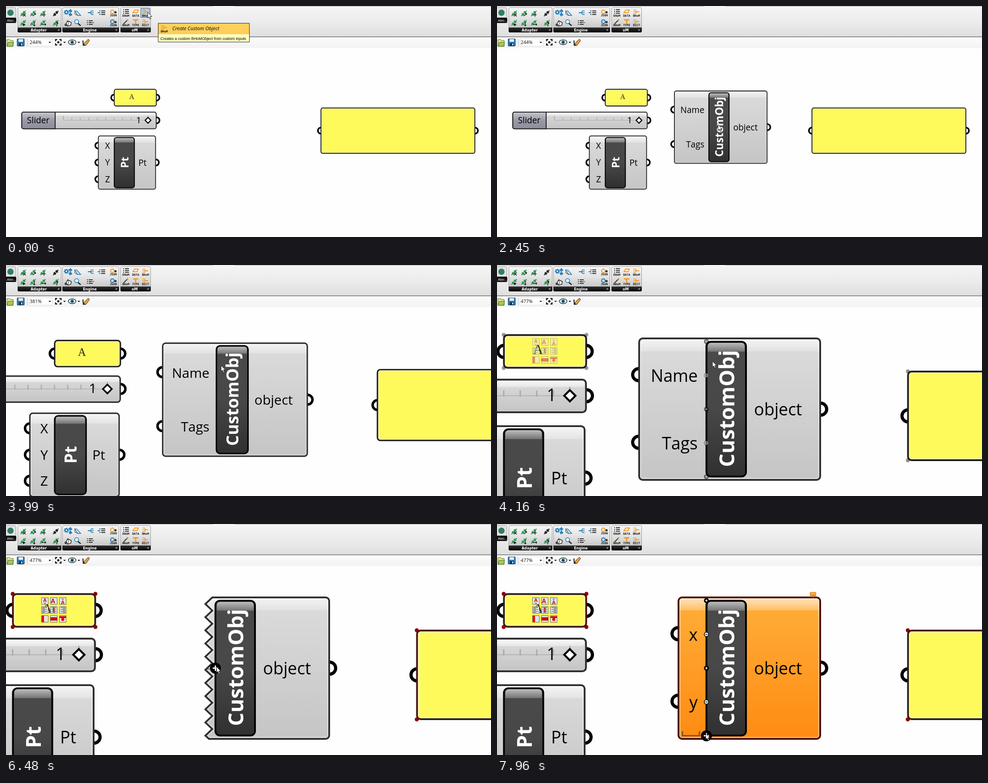
An HTML page with a canvas for the animation above (8 s loop, 1085 by 516 pixels).

```html
<!DOCTYPE html>
<html>
<head>
<meta charset="utf-8">
<style>
html, body { margin: 0; width: 100%; height: 100%; overflow: hidden; background: #fff }
canvas { display: block }
</style>
</head>
<body>
<canvas id="stage" width="1085" height="516"></canvas>
<script>
const g = document.getElementById('stage').getContext('2d');
g.fontKerning = 'none';
const UI = '"Open Sans", sans-serif', ARIAL = '"Liberation Sans", sans-serif';
const LOOP = 8000, FX = 479.6, FY = 217;   // fixed point of the zoom

// Cursor moves: start, end, number of steps, new x, new y
const moves = [
  [1060, 1590, 8, 501, 272], [2380, 2600, 4, 475, 244], [3380, 3540, 3, 480, 239],
  [3770, 4080, 5, 482, 215], [4235, 4390, 3, 477, 234], [4550, 4550, 1, 475, 241],
  [5080, 5550, 7, 463, 323], [5860, 6020, 3, 470, 264], [6160, 6260, 2, 468, 315],
  [6410, 6480, 2, 471, 319], [6890, 7500, 9, 467, 466], [7960, 7960, 1, 467, 468]
];
// Values that jump at given times
const zooms = [[0, 244], [3770, 305], [3850, 342], [3925, 381], [4000, 427], [4080, 477]];
const fades = [[0, 0], [4080, .2], [4160, .45], [4235, .65], [4312, .85], [4390, 1]];
const inputs = [[0, null], [2060, ['Name', 'Tags']], [4930, ['Tags']], [5700, []], [6740, ['x']], [7800, ['x', 'y']]];
const leftEdge = { Name: 318, Tags: 340, x: 406 };

const at = (steps, t) => steps.filter(s => s[0] <= t).pop()[1];
const within = (t, a, b) => t >= a && t < b;

function cursorAt(t) {
  let x = 317, y = 14;
  for (const [a, b, n, nx, ny] of moves) {
    if (t < a) break;
    const p = t >= b ? 1 : (Math.floor((t - a) / (b - a) * (n - 1)) + 1) / n;
    x += (nx - x) * p;
    y += (ny - y) * p;
  }
  return [x, y];
}

function grad(y, h, ...colors) {
  const l = g.createLinearGradient(0, y, 0, y + h);
  colors.forEach((c, i) => l.addColorStop(i / (colors.length - 1), c));
  return l;
}
function paint(fill, stroke, lw = 1) {
  if (fill) { g.fillStyle = fill; g.fill(); }
  if (stroke) { g.strokeStyle = stroke; g.lineWidth = lw; g.stroke(); }
}
function box(x, y, w, h, fill, stroke, lw, r = 0) {
  g.beginPath(); g.roundRect(x, y, w, h, r); paint(fill, stroke, lw);
}
function dot(x, y, r, fill, stroke, lw) {
  g.beginPath(); g.arc(x, y, r, 0, 7); paint(fill, stroke, lw);
}
function poly(pts, fill, stroke, lw) {
  g.beginPath();
  for (let i = 0; i < pts.length; i += 2) g.lineTo(pts[i], pts[i + 1]);
  if (fill) g.closePath();
  paint(fill, stroke, lw);
}
function text(s, x, y, font, color = '#000', align = 'left') {
  g.font = font; g.fillStyle = color; g.textAlign = align; g.fillText(s, x, y);
}
function moved(x, y, angle, draw) {
  g.save(); g.translate(x, y); g.rotate(angle); draw(); g.restore();
}

// ---- Canvas objects, in coordinates of 477 % zoom ----
const label = (s, x, y, align, color) => text(s, x, y, '37.5px ' + UI, color, align);
const grip = (x, y) => dot(x, y, 13.5, '#fff', '#000', 7);

function capsule(x, y, w, h, glossy = h > 100) {
  box(x, y, w, h, grad(y, h, '#dcdcdc', '#c5c5c5'), null, 0, 8);
  if (glossy) {
    box(x + 3, y + 3, w - 6, h - 6, null, 'rgba(255,255,255,.35)', 3, 6);
    box(x + 3, y + 2, w - 6, 27, grad(y, 30, 'rgba(255,255,255,.75)', 'rgba(255,255,255,.25)'));
  } else box(x + 3, y + 3, w - 6, 14, grad(y, 17, '#fff', '#e4e4e4'), null, 0, 6);
  box(x, y, w, h, null, '#303030', 4, 8);
}
function nameplate(s, x, y, w, h, cy, size) {
  box(x, y, w, h, grad(y, h, '#4a4a4a', '#484848', '#303030'), null, 0, 10);
  box(x + 3, y + 2, w - 6, 20, grad(y, 22, '#c4c4c4', '#747474'), null, 0, [7, 7, 0, 0]);
  box(x, y, w, h, null, '#000', 4, 10);
  moved(x + 62, cy, -Math.PI / 2, () => text(s, 0, 0, `bold ${size}px ${UI}`, '#fff', 'center'));
}
function panel(x, y, w, h, alpha) {
  grip(x, y + h / 2); grip(x + w, y + h / 2);
  box(x, y, w, h, '#fffa5c', null, 0, 8);
  box(x + 3, y + 3, w - 6, h - 6, null, '#fffcb0', 3, 5);
  box(x, y, w, h, null, '#1e1e1e', 4, 8);
  const color = alpha < 1 ? '#302020' : '#8b0000';
  g.globalAlpha = alpha;
  box(x - .5, y - .5, w + 1, h + 1, null, color, 1);
  for (const px of [x - .5, x + w + .5]) for (const py of [y - .5, y + h + .5]) dot(px, py, 4.5, color);
  g.globalAlpha = 1;
}
function alignIcons(alpha) {
  g.globalAlpha = alpha;
  for (let i = 0; i < 9; i++) {
    const col = i % 3, row = i / 3 | 0, x = 79 + col * 20, y = 164 + row * 20;
    box(x + .5, y + .5, 15, 15, '#e4e4e4', '#666');
    if (row == 0) {
      text('A', x + (col == 1 ? 6 : 8), y + [10, 13, 15][col], `bold ${col == 1 ? 14 : 11}px ${ARIAL}`, '#c00020', 'center');
      if (col != 1) poly(col ? [x + 5, y + 5, x + 8, y + 2, x + 11, y + 5] : [x + 5, y + 12, x + 8, y + 15, x + 11, y + 12], '#777');
    } else if (row == 1) {
      for (let k = 0; k < 6; k++) {
        const w = k % 2 ? 6 : 11;
        box(x + [2, 8 - w / 2, 14 - w][col], y + 2 + k * 2.2, w, 1, '#444');
      }
      if (col == 1) box(x + 7, y + 3, 2, 10, '#d00020');
    } else if (col == 0) box(x + 1, y + 1, 5, 14, '#f00000');
    else if (col == 1) box(x + 1, y + 5, 14, 6, '#e00000', '#700');
    else { box(x + 1, y + 2, 14, 4, '#e00000'); dot(x + 8, y + 9, 3.5, '#e00000'); }
  }
  g.globalAlpha = 1;
}
function slider() {
  grip(200, 292);
  capsule(-389, 256, 588, 73);
  box(-389, 256, 146, 73, grad(256, 73, '#c6c6cf', '#9a9aa6', '#8c8c9b'), '#222', 4, [8, 0, 0, 8]);
  label('Slider', -317, 305, 'center');
  box(-207, 291, 370, 2, '#b4b4b4');
  for (let i = 0; i <= 10; i++) box(-208.5 + i * 37, i % 10 ? 280 : 272, 3, i % 10 ? 14 : 20, '#aaa');
  label('1', 122, 304, 'center');
  poly([163, 279.5, 175.5, 292, 163, 304.5, 150.5, 292, 163, 279.5], '#fff', '#000', 4.5);
}
function point() {
  grip(197, 476);
  for (const y of [402, 476, 549]) grip(-54, y);
  capsule(-54, 360, 250, 233);
  ['X', 'Y', 'Z'].forEach((s, i) => label(s, -14, 416 + i * 73.5, 'center'));
  nameplate('Pt', 15.5, 367, 88, 220, 476, 46);
  label('Pt', 139, 490, 'center');
}
function widget(y, plus, hot) {
  const r = hot ? 12 : 5.5, ink = plus ? '#fff' : '#000', d = r * .5;
  dot(468.5, y, r - .7, plus ? '#000' : '#fff', '#000', hot ? 2 : 1.6);
  poly([468.5 - d, y, 468.5 + d, y], null, ink, hot ? 3 : 1.5);
  if (plus) poly([468.5, y - d, 468.5, y + d], null, ink, hot ? 3 : 1.5);
}
// Rounded body, with a jagged left side while there are no inputs
function objectPath(jagged, x) {
  const top = 164, bottom = 480, right = 723;
  g.beginPath();
  if (!jagged) return g.roundRect(x, top, right - x, bottom - top, 8);
  for (let i = 0; i <= 21; i++) g.lineTo(i % 2 ? 446 : 461.5, top + i * 14.7);
  g.lineTo(454, bottom);
  g.arcTo(right, bottom, right, top, 8);
  g.arcTo(right, top, 461.5, top, 8);
  g.closePath();
}
function customObject(t, list, alpha, [cx, cy]) {
  const n = list.length, orange = t >= 6740, x = n ? leftEdge[list[0]] : 446;
  const rows = n == 2 ? [246, 397] : n ? [322] : [];
  grip(724, 322);
  rows.forEach(y => grip(x - 1, n == 2 ? y - 1 : y));
  g.save();
  objectPath(!n, x);
  paint(orange ? grad(164, 316, '#ffae3a', '#ff8b12') : grad(164, 316, '#dcdcdc', '#c5c5c5'));
  g.clip();
  paint(null, 'rgba(255,255,255,.4)', 9);
  box(x, 164, 723 - x, 29, grad(164, 29, 'rgba(255,255,255,.7)', 'rgba(255,255,255,.22)'));
  g.restore();
  objectPath(!n, x);
  paint(null, orange ? '#4d0d08' : '#303030', 4);
  nameplate('CustomObj', 468.5, 171.5, 88.5, 301, 320.5, 47);
  rows.forEach((y, i) => label(list[i], 449, y + 14.5, 'right'));
  label('object', 575, 336);
  if (orange) {
    poly([704, 160, 711, 160, 707, 165], '#e07a10');
    box(700.5, 152.5, 13, 8, grad(152, 9, '#ffc060', '#ff8c14'), '#c8691a', 1, 1);
  }
  // previews of the insert or remove action
  const mark = 'rgba(50,50,50,.65)';
  if (within(t, 4700, 4930)) box(330.5, 180, 122, 132, null, mark, 3);
  if (within(t, 5550, 5700)) box(352.5, 180, 100, 284, null, mark, 3);
  if (within(t, 6410, 6740)) poly([451, 321, 451, 324, 458, 324], null, mark, 2);
  if (t >= 7500) poly([415, 463, 415, 473, 453, 473, 453, 463], null, mark, 3);

  if (!alpha) return;
  g.globalAlpha = alpha;
  const marks = n ? 2 * n : 0;
  for (let i = 0; i <= marks; i++) {
    const y = marks ? 171 + i * 302 / marks : 322;
    widget(y, i % 2 == 0, alpha == 1 && Math.hypot(cx - 468.5, cy - y) < 11);
  }
  g.globalAlpha = 1;
}

// ---- Toolbars ----
const BLUE = '#1778b8', ORANGE = '#f09a2a', GREEN = '#2f9a55';

function plug(x, y, color, sign) {
  moved(x, y, -Math.PI / 4, () => {
    box(-8, -1, 4, 2, color);
    box(-5, -3, 5, 6, color, null, 0, 2);
    box(1, -3, 5, 6, color, null, 0, 2);
    box(6, -1, 3, 2, color);
  });
  if (sign) text(sign, x + 3, y + 7, 'bold 12px "DejaVu Sans", sans-serif', '#111', 'center');
}
function branches(x, y, color, flip = 1) {
  for (const d of [-4, 0, 4]) poly([x - 6 * flip, y, x, y, x + 2 * flip, y + d, x + 7 * flip, y + d], null, color, 1.5);
}
function lines(x, y, color) {
  for (const d of [-4, 0, 4]) { box(x - 6, y + d - 1, 2, 2, color); box(x - 2, y + d - 1, 9, 2, color); }
}
function gear(x, y, r) {
  g.setLineDash([2, 1.6]); dot(x, y, r, null, BLUE, 3); g.setLineDash([]);
  dot(x, y, r - 1, null, BLUE, 2);
}
const tag = (s, x, y) => text(s, x, y, 'bold 6.5px "DejaVu Sans Mono", monospace', '#111', 'center');

function group(x, w, name) {
  box(x + .5, 3.5, w - 1, 55, grad(4, 44, '#f6f6f6', '#e4e4e4', '#cacaca'), '#9a9a9a', 1, 3);
  box(x, 48, w, 11, grad(48, 11, '#333', '#000'), null, 0, [0, 0, 3, 3]);
  text(name, x + w / 2 - 2, 57, 'bold 8px "DejaVu Sans", sans-serif', '#fff', 'center');
  text('+', x + w - 6, 57, 'bold 9px ' + ARIAL, '#bbb', 'center');
}
function ribbon(picked) {
  box(0, 0, 1085, 69, grad(0, 69, '#f5f5f5', '#ececec', '#dfdfdf'));
  box(0, 0, 1085, 1, '#aaa');
  box(463, 0, 48, 1, '#eee');
  box(0, 68, 1085, 1, '#777');
  box(0, 69, 1085, 1, '#aaa');

  box(-4, 3.5, 26, 34, '#e2e2e2', '#9a9a9a', 1, 3);
  dot(10, 15, 7, '#2f7f66');
  box(-4, 26, 27, 12, '#111', null, 0, 3);
  text('Abo...', 2, 35, '8px ' + ARIAL, '#fff');

  group(26, 98, 'Adapter');
  group(126, 127, 'Engine');
  group(256, 68, 'oM');

  ['×', '↗', '+', '', '▸', '↓', '→', '?'].forEach((s, i) =>
    plug([38, 60, 82, 111][i % 4], i < 4 ? 17 : 38, i == 3 ? '#222' : GREEN, s));

  gear(135, 14, 4); gear(144, 11, 2.5); gear(144, 19, 2.5);
  poly([154, 10, 160, 21, 167, 21, 157, 10], null, BLUE, 1.5);
  poly([154, 10, 154, 18, 160, 21], null, '#222', 1);
  branches(189, 15, BLUE);
  lines(215, 15, '#333'); box(205, 14, 6, 2, BLUE);
  lines(187, 37, '#333'); box(191, 36, 6, 2, '#777');
  poly([134, 40, 138, 33, 146, 37, 145, 43, 138, 45], '#fff', '#222', 1.5);
  poly([138, 33, 140, 39, 138, 45], null, '#222', 1);
  dot(134, 42, 3, '#444');
  dot(158, 35, 4.5, '#e6f2f8', BLUE, 1.5);
  poly([161, 39, 167, 44], null, '#222', 2.5);
  for (const [y, c] of [[13, ORANGE], [35, BLUE]]) {
    dot(238, y, 4, null, c, 2); dot(245, y + 1, 2.5, '#333');
    tag('JSON', 240, y + 10);
  }

  if (picked) box(301.5, 5.5, 20, 20, '#b7cde2', '#44627f', 1);
  lines(268, 12, '#333');
  poly([284, 15, 288, 9, 296, 9, 293, 15], '#fff', ORANGE, 2);
  branches(312, 13, ORANGE, -1);
  poly([263, 40, 272, 31], null, '#333', 2); dot(272, 31, 2, ORANGE);
  poly([284, 31, 296, 31], null, ORANGE, 3); poly([290, 31, 290, 40], null, ORANGE, 3);
  branches(312, 35, ORANGE, -1);
  ['ENUM', 'DATA', 'BHoM', 'BHoM', 'TYPE', 'DICT'].forEach((s, i) => tag(s, 268 + i % 3 * 22, i < 3 ? 24 : 45));
}
function canvasBar(zoom) {
  box(0, 70, 1085, 24, grad(70, 24, '#fbfbfb', '#f3f3f3'));
  poly([2, 75, 8, 75, 10, 77, 16, 77, 16, 90, 2, 90], '#f2e58a', '#3d6b2a', 1);
  poly([2, 90, 5, 81, 17, 81, 15, 90], '#a9c84e', '#3d6b2a', 1);
  box(25, 73.5, 16, 16, '#2878b4', '#123c66', 1, 1);
  box(28, 74, 10, 6, '#f3f3f3'); box(29, 83, 8, 6, '#1d3550'); box(34, 84, 2, 4, '#fff');
  box(47, 73, 1, 17, '#bbb');
  box(51.5, 73.5, 52, 16, '#fff', '#ddd');
  text(Math.round(zoom) + '%', 53, 85, '10.5px ' + UI, '#111');
  for (const x of [98, 131, 163]) poly([x - 3, 80, x + 3, 80, x, 83], '#111');
  for (const sx of [-1, 1]) for (const sy of [-1, 1])
    poly([117 + sx * 2.5, 81 + sy * 6, 117 + sx * 6, 81 + sy * 6, 117 + sx * 6, 81 + sy * 2.5], null, '#111', 2.5);
  dot(117, 81, 2.5, '#111');
  g.beginPath(); g.ellipse(148, 81, 8.5, 5.5, 0, 0, 7); paint('#fff', '#233', 1.5);
  dot(148, 81, 4, '#3c7fa8'); dot(148, 81, 1.8, '#111');
  poly([172, 88, 179, 88, 187, 77, 184, 74, 177, 81], '#e9a13c', '#222', 1);
  poly([171, 78, 173, 76, 174, 85, 178, 88, 172, 89], '#222');
}
function tooltip() {
  box(340.5, 38.5, 204, 42, '#ffffbf', '#222');
  box(341, 39, 203, 24, grad(39, 24, '#ffd25f', '#ffcb56'));
  branches(354, 48, ORANGE, -1);
  tag('BHoM', 354, 59);
  text('Create Custom Object', 372, 54, 'italic 11px ' + UI);
  text('Creates a custom BHoMObject from custom inputs', 345.5, 76, '8.5px ' + ARIAL);
}
function hoverTip() {
  box(489.5, 261.5, 150, 75, '#ffffbf', '#222');
  box(490, 262, 149, 24, '#ffcf5a');
  text('CustomObj', 521, 278, 'italic 11px ' + UI);
  branches(503, 274, ORANGE, -1);
  text('Creates a custom BHoMObject', 495, 303, '8.5px ' + ARIAL);
  text('from custom inputs', 495, 316, '8.5px ' + ARIAL);
}
function cursor(x, y, dragging) {
  moved(x, y, 0, () => {
    if (dragging) {
      g.setLineDash([1, 1]); box(2.5, 13.5, 9, 5, null, '#333'); g.setLineDash([]);
      box(7.5, 14.5, 8, 8, '#fff', '#222');
      box(9, 18, 5, 1, '#111'); box(11, 16, 1, 5, '#111');
    }
    poly([0, 0, 0, 13, 3, 10.3, 5.2, 15.3, 7.4, 14.3, 5.3, 9.5, 9.4, 9.5], '#fff', '#222', 1);
  });
}

function draw(t) {
  const zoom = at(zooms, t), alpha = at(fades, t), list = at(inputs, t), pos = cursorAt(t), k = zoom / 477;
  box(0, 0, 1085, 516, '#fefefe');
  g.save();
  g.translate(FX, FY); g.scale(k, k); g.translate(-FX, -FY);
  panel(15.5, 156.5, 184, 73, alpha);
  text('A', 92, 199, '31px "Liberation Serif", serif', '#222', 'center');
  alignIcons(alpha);
  slider();
  point();
  panel(919.5, 238, 673, 198, alpha);
  if (list) customObject(t, list, alpha, pos);
  g.restore();
  ribbon(t < 1060);
  canvasBar(zoom);
  if (t < 1060) tooltip();
  if (within(t, 2920, 3310)) hoverTip();
  cursor(...pos, within(t, 1130, 2140));
}

const start = performance.now();
function tick() {
  draw((performance.now() - start) % LOOP);
  requestAnimationFrame(tick);
}
tick();
</script>
</body>
</html>
```
